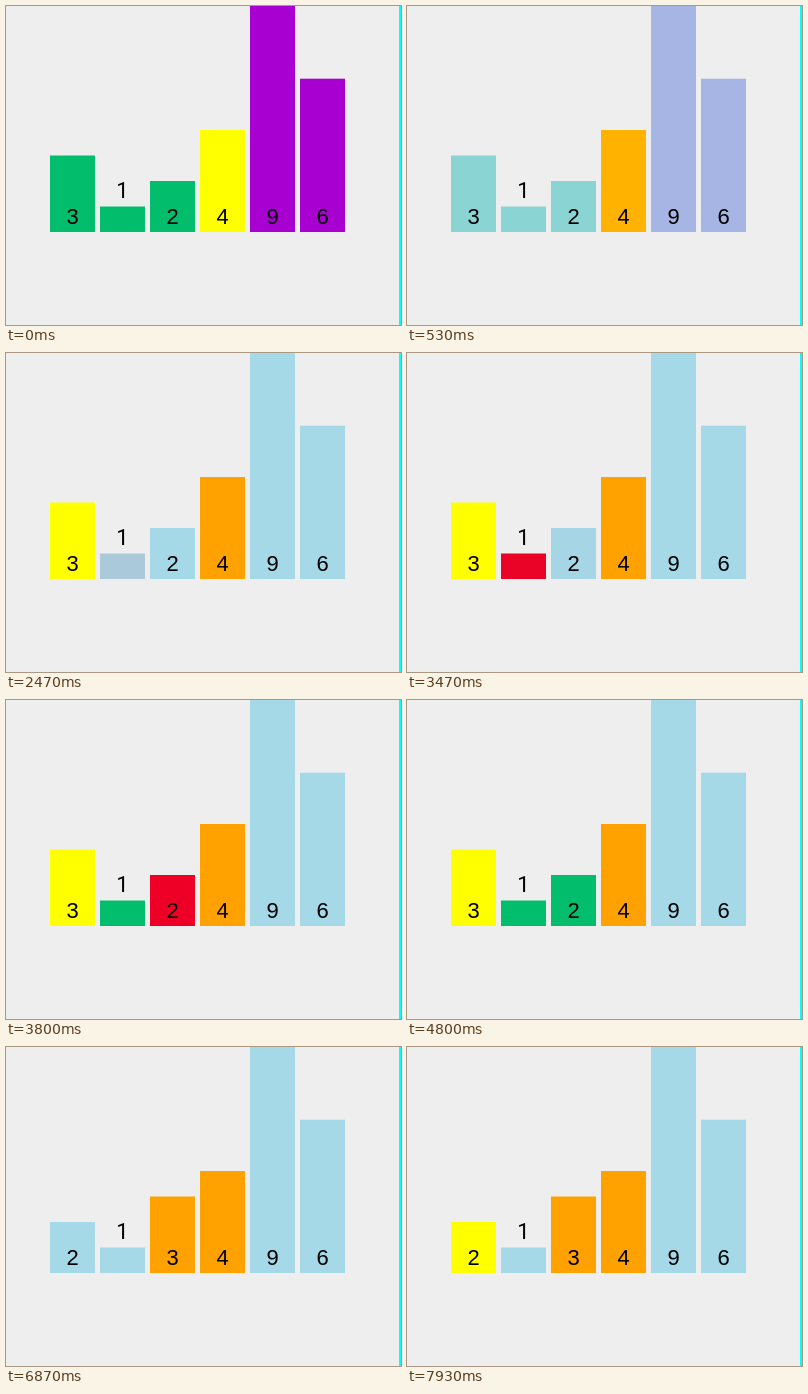
Recreate the animation shown at these times as an HTML page. Size 395x319 px, loop 8 s.

```html
<!DOCTYPE html>
<html lang="en">
<head>
<meta charset="utf-8">
<title>Quicksort bars</title>
<style>
  :root {
    --idle: #a5d9e8;
    --done: #02bd6c;
    --pivot: #ffff00;
    --sorted: #ffa200;
    --active: #ee0026;
    --right: #a800d0;
    --ease: cubic-bezier(.65, 0, .35, 1);
  }
  html, body { margin: 0; width: 100%; height: 100%; overflow: hidden; background: #eee; }
  svg { display: block; width: 395px; height: 319px; }
  rect, text { animation: 8s var(--ease) infinite; }
  text { font: 22px "Liberation Sans", Arial, sans-serif; text-anchor: middle; }
  .one { font-family: Roboto, sans-serif; }

  .b3 { animation-name: color3, shift3; }
  .b1 { animation-name: color1; }
  .b2 { animation-name: color2, shift2; }
  .b4 { animation-name: color4; }
  .big { animation-name: colorBig; }
  .t3 { animation-name: shift3; }
  .t2 { animation-name: shift2; }

  @keyframes color3 {
    0%, 4.19% { fill: var(--done); }
    7.94%, 17.19% { fill: var(--idle); }
    20.94%, 81.94% { fill: var(--pivot); }
    85.69%, 100% { fill: var(--sorted); }
  }
  @keyframes color1 {
    0%, 4.19% { fill: var(--done); }
    7.94%, 29.94% { fill: var(--idle); }
    33.69%, 42.88% { fill: var(--active); }
    46.63%, 81.94% { fill: var(--done); }
    85.69%, 100% { fill: var(--idle); }
  }
  @keyframes color2 {
    0%, 4.19% { fill: var(--done); }
    7.94%, 42.88% { fill: var(--idle); }
    46.63%, 55.81% { fill: var(--active); }
    59.56%, 81.94% { fill: var(--done); }
    85.69%, 94.5% { fill: var(--idle); }
    98.25%, 100% { fill: var(--pivot); }
  }
  @keyframes color4 {
    0%, 4.19% { fill: var(--pivot); }
    7.94%, 100% { fill: var(--sorted); }
  }
  @keyframes colorBig {
    0%, 4.19% { fill: var(--right); }
    7.94%, 100% { fill: var(--idle); }
  }
  @keyframes shift3 {
    0%, 69.19% { transform: translateX(0); }
    72.94%, 100% { transform: translateX(100px); }
  }
  @keyframes shift2 {
    0%, 69.19% { transform: translateX(0); }
    72.94%, 100% { transform: translateX(-100px); }
  }
</style>
</head>
<body>
<svg viewBox="0 0 395 319">
  <rect class="b3" x="44" y="149.5" width="45" height="76.5"/>
  <rect class="b1" x="94" y="200.5" width="45" height="25.5"/>
  <rect class="b2" x="144" y="175" width="45" height="51"/>
  <rect class="b4" x="194" y="124" width="45" height="102"/>
  <rect class="big" x="244" y="-3.5" width="45" height="229.5"/>
  <rect class="big" x="294" y="72.7" width="45" height="153.3"/>
  <text class="t3" x="66.5" y="218">3</text>
  <text class="one" x="116.5" y="192">1</text>
  <text class="t2" x="166.5" y="218">2</text>
  <text x="216.5" y="218">4</text>
  <text x="266.5" y="218">9</text>
  <text x="316.5" y="218">6</text>
  <rect x="393" width="2" height="319" fill="#0ff"/>
</svg>
</body>
</html>
```
